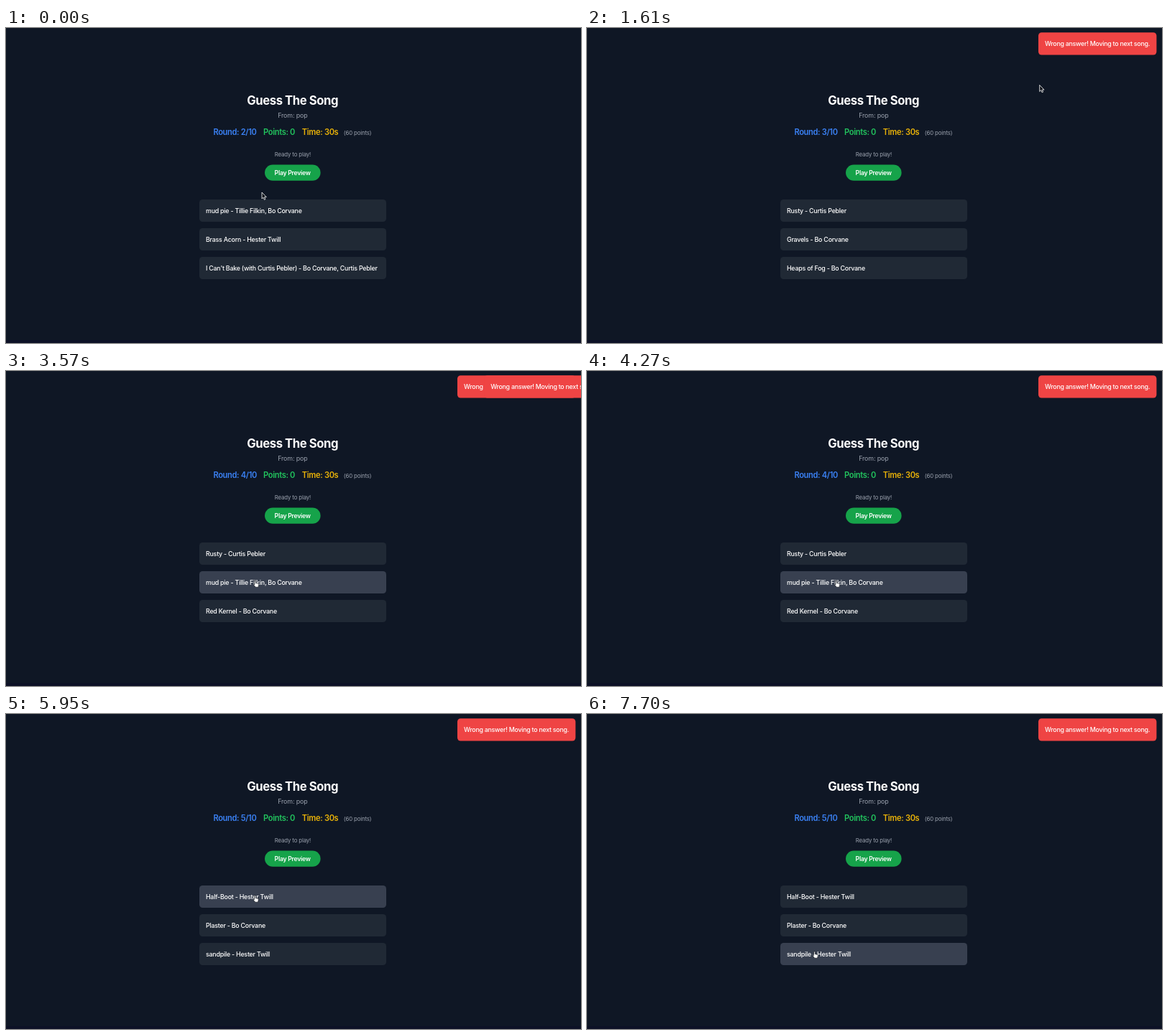
An HTML page that plays this animation: 800x439 px, repeating every 8 s.

```html
<!DOCTYPE html>
<html lang="en">
<head>
<meta charset="utf-8">
<title>Song quiz</title>
<style>
  html, body { margin: 0; width: 100%; height: 100%; overflow: hidden; background: #0f1725; }
  svg { display: block; width: 100%; height: 100%; }
  text { font: 500 8.89px Inter, "Liberation Sans", sans-serif; letter-spacing: -.027em; fill: #fff; }
  .mid { text-anchor: middle; }
  .title { font-size: 16.67px; font-weight: 700; letter-spacing: -.025em; }
  .stat { font-size: 11.1px; font-weight: 600; letter-spacing: -.03em; }
  .muted { fill: #9ca3af; font-weight: 400; letter-spacing: -.015em; }
  .small { font-size: 7.78px; }
  .button { font-size: 8.6px; font-weight: 600; }
  .toast { letter-spacing: -.031em; }
</style>
</head>
<body>
<svg viewBox="0 0 800 439">
  <rect y="435" width="800" height="4" fill="#0d1126"/>
  <text class="mid title" x="398.7" y="106.8">Guess The Song</text>
  <text class="mid muted" x="398.8" y="125">From: pop</text>
  <text class="stat" id="round" x="288.4" y="149.2" style="fill:#3b82f6"></text>
  <text class="stat" x="358" y="149.2" style="fill:#22c55e">Points: 0</text>
  <text class="stat" x="411.8" y="149.2" style="fill:#eab308">Time: 30s</text>
  <text class="muted small" x="469.8" y="149.2">(60 points)</text>
  <text class="mid muted small" x="399" y="178.8">Ready to play!</text>
  <rect x="360" y="190.4" width="77.6" height="22.4" rx="11.2" fill="#16a34a"/>
  <text class="mid button" x="398.7" y="204.9">Play Preview</text>
  <g id="options"></g>
  <g id="toasts"></g>
  <path id="arrow" d="M0 0V9L2 7.2 3.4 10.3 4.9 9.6 3.5 6.6H6.3Z" fill="#11151c" stroke="#fff" stroke-width=".8"/>
  <path id="hand" d="M-1 .8A.9 .9 0 0 1 .8 .8V3.6L3.8 4.2Q5 4.5 4.8 5.8L4.1 9.2H.2L-2.6 5.8Q-2.4 4.8-1 5.6Z"
        fill="#fff" stroke="#11151c" stroke-width=".7"/>
</svg>
<script>
const LOOP = 8000, STEP = 70;
const CLICKS = [630, 3360, 5880];
const TOAST = { delay: 70, enter: 350, life: 3300, leave: 200, travel: 172 };
const ROW = { x: 269, y: 239, w: 260, h: 31, pitch: 40 };

const [ANN, BEN, CAT, DAN] = ['Tillie Filkin', 'Bo Corvane', 'Hester Twill', 'Curtis Pebler'];
const ROUNDS = [
  [`mud pie - ${ANN}, ${BEN}`, `Brass Acorn - ${CAT}`, `I Can't Bake (with ${DAN}) - ${BEN}, ${DAN}`],
  [`Rusty - ${DAN}`, `Gravels - ${BEN}`, `Heaps of Fog - ${BEN}`],
  [`Rusty - ${DAN}`, `mud pie - ${ANN}, ${BEN}`, `Red Kernel - ${BEN}`],
  [`Half-Boot - ${CAT}`, `Plaster - ${BEN}`, `sandpile - ${CAT}`]
];

// Pointer waypoints: time, x, y
const PATH = [
  [0, 356, 229], [70, 356, 229], [420, 350, 288], [840, 350, 288],
  [1400, 640, 50], [1470, 640, 50], [1610, 629.7, 79.5], [1750, 629.7, 79.5],
  [1890, 654, 49], [2100, 654, 49], [2520, 500, 215], [2870, 361, 262],
  [3010, 358, 282], [3080, 358, 282], [3290, 347, 292], [4620, 347, 292],
  [4970, 344, 333], [5180, 344, 333], [5390, 346, 274], [5530, 346.5, 253],
  [7070, 346.5, 253], [7560, 316.5, 331], [LOOP, 316.5, 331]
];

const $ = id => document.getElementById(id);
const clamp = v => Math.min(1, Math.max(0, v));
const smooth = p => p * p * (3 - 2 * p);
const mix = (a, b, p) => a + (b - a) * p;

function add(parent, tag, attrs, content = '') {
  const node = document.createElementNS('http://www.w3.org/2000/svg', tag);
  for (const key in attrs) node.setAttribute(key, attrs[key]);
  node.textContent = content;
  return parent.appendChild(node);
}

const rows = [0, 1, 2].map(i => {
  const y = ROW.y + i * ROW.pitch;
  return {
    box: add($('options'), 'rect', { x: ROW.x, y, width: ROW.w, height: ROW.h, rx: 4.5 }),
    label: add($('options'), 'text', { x: 278, y: y + 19 })
  };
});

const toasts = CLICKS.map(() => {
  const group = add($('toasts'), 'g', {});
  add(group, 'rect', { x: 628, y: 6.2, width: 164.4, height: 31.3, rx: 4.5, fill: '#ef4444' });
  add(group, 'text', { class: 'toast', x: 637, y: 25.2 }, 'Wrong answer! Moving to next song.');
  return group;
});

function pointer(t) {
  const i = Math.max(1, PATH.findIndex(point => point[0] >= t));
  const [t0, x0, y0] = PATH[i - 1], [t1, x1, y1] = PATH[i];
  const p = smooth(clamp((t - t0) / (t1 - t0)));
  return [mix(x0, x1, p), mix(y0, y1, p)];
}

function hoveredRow(t) {
  const [x, y] = pointer(Math.max(0, t));
  const i = Math.floor((y - ROW.y) / ROW.pitch);
  const inside = x >= ROW.x && x <= ROW.x + ROW.w && y - ROW.y - i * ROW.pitch <= ROW.h;
  return inside && i >= 0 && i < 3 ? i : -1;
}

// Share of the last 150 ms spent over a row, giving a linear colour transition
function glow(i, t) {
  let hits = 0;
  for (let k = 0; k < 15; k++) hits += hoveredRow(t - k * 10) === i;
  return hits / 15;
}

function toastShift(age) {
  const entering = Math.pow(1 - clamp((age - TOAST.delay) / TOAST.enter), 3);
  const leaving = Math.pow(clamp((age - TOAST.life) / TOAST.leave), 1.5);
  return TOAST.travel * Math.max(entering, leaving);
}

function draw(t) {
  const answered = CLICKS.filter(click => t >= click).length;
  $('round').textContent = `Round: ${answered + 2}/10`;

  rows.forEach(({ box, label }, i) => {
    const p = glow(i, t);
    box.setAttribute('fill', `rgb(${mix(32, 56, p)},${mix(41, 64, p)},${mix(53, 80, p)})`);
    label.textContent = ROUNDS[answered][i];
  });

  toasts.forEach((toast, i) =>
    toast.setAttribute('transform', `translate(${toastShift(t - CLICKS[i])} 0)`));

  const [x, y] = pointer(t), isHand = hoveredRow(t) >= 0;
  for (const [id, shown] of [['arrow', !isHand], ['hand', isHand]]) {
    $(id).setAttribute('transform', `translate(${x} ${y})`);
    $(id).setAttribute('visibility', shown ? 'visible' : 'hidden');
  }
}

const start = performance.now();
function tick() {
  const t = (performance.now() - start) % LOOP;
  draw(Math.floor(t / STEP) * STEP);
  requestAnimationFrame(tick);
}
tick();
</script>
</body>
</html>
```
